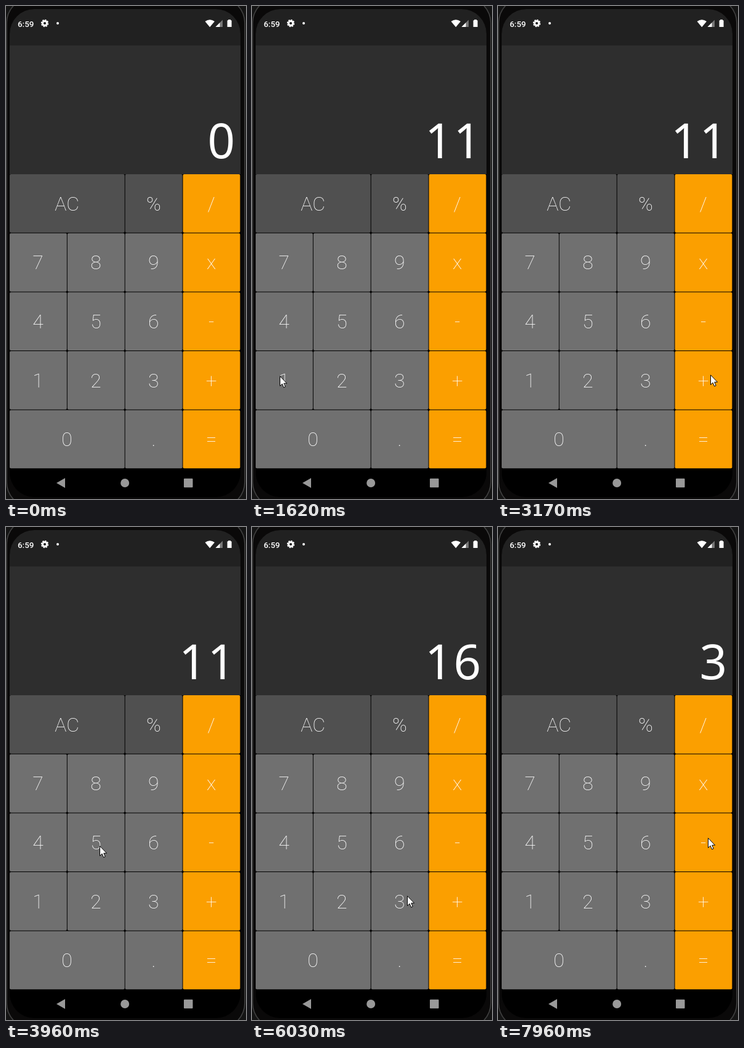
These frames come from a looping animation (390 by 800 pixels, 8 s). An HTML page:

```html
<!DOCTYPE html>
<html lang="en">
<head>
<meta charset="utf-8">
<title>Calculator</title>
<style>
  html, body { margin: 0; width: 100%; height: 100%; overflow: hidden; background: #141414; }
  svg { display: block; }
  #labels { font: 200 32px Roboto, sans-serif; fill: #fff; text-anchor: middle; }
  .clock { font: 500 13.4px Roboto, sans-serif; fill: #fff; }
  #display { font: 500 78px "Noto Sans", sans-serif; letter-spacing: 2px; fill: #fff; text-anchor: end; }
</style>
</head>
<body>
<svg width="390" height="800" viewBox="0 0 390 800">
  <clipPath id="screen"><rect x="6" y="5" width="375" height="792" rx="40"/></clipPath>
  <rect x="1" y="-14" width="387" height="828" rx="42" fill="#0a0909" stroke="#404040" stroke-width="1.6"/>
  <g clip-path="url(#screen)">
    <rect x="6" y="5" width="375" height="792"/>
    <rect x="6" y="5" width="375" height="59" fill="#212121"/>
    <rect x="6" y="64" width="375" height="209" fill="#2e2e2e"/>
  </g>

  <text class="clock" x="19" y="33.5">6:59</text>
  <g fill="none" stroke="#fff">
    <circle cx="63" cy="28" r="3.5" stroke-width="2.8"/>
    <circle cx="63" cy="28" r="5.2" stroke-width="2" pathLength="16" stroke-dasharray="1.3 .7"/>
  </g>
  <g fill="#fff">
    <circle cx="84" cy="28" r="2"/>
    <path d="M323.5 25Q331.2 19.5 339 25L331.2 34.2Z"/>
    <path d="M352 22.5V34H340.5Z" fill="#777"/>
    <path d="M347.5 27V34H340.5Z"/>
    <path d="M361.2 22H365V23.3H366.6V34H359.6V23.3H361.2Z"/>
  </g>

  <text id="display" x="374.2" y="247"></text>
  <g id="keys"></g>
  <rect id="highlight" x="287.5" y="560" width="93" height="94.7" rx="2" fill-opacity=".1"/>
  <circle id="ripple" fill-opacity=".11"/>
  <g id="labels"></g>

  <g fill="#999">
    <path d="M82 774L96 766V782Z"/>
    <circle cx="193.2" cy="774" r="7"/>
    <rect x="289" y="766.7" width="14.5" height="14.5" rx="1"/>
  </g>

  <path id="cursor" d="M.5 .8V16.6L4.1 13.2L6.6 19.1L9.2 18L6.8 12.3H11.6Z" fill="#fff" stroke="#000" stroke-linejoin="round"/>
</svg>
<script>
const LOOP = 8000, STEP = 77;
const $ = id => document.getElementById(id);

// Keypad: each row lists label and column span.
const LEFT = 5.5, TOP = 272.6, COL = 93.85, ROW = 95.65, GAP = 1;
const rows = [
  [['AC', 2], ['%', 1], ['/', 1]],
  [['7', 1], ['8', 1], ['9', 1], ['x', 1]],
  [['4', 1], ['5', 1], ['6', 1], ['-', 1]],
  [['1', 1], ['2', 1], ['3', 1], ['+', 1]],
  [['0', 2], ['.', 1], ['=', 1]]
];
let keys = '', labels = '';
rows.forEach((row, r) => {
  let col = 0;
  for (const [label, span] of row) {
    const x = LEFT + col * COL, y = TOP + r * ROW, w = span * COL;
    const color = col === 3 ? '#fb9f00' : r === 0 ? '#505050' : '#707070';
    keys += `<rect x="${x + GAP / 2}" y="${y + GAP / 2}" width="${w - GAP}" height="${ROW - GAP}" rx="2" fill="${color}"/>`;
    labels += `<text x="${x + w / 2 - .3}" y="${y + ROW / 2 + 11.4}">${label}</text>`;
    col += span;
  }
});
$('keys').innerHTML = keys;
$('labels').innerHTML = labels;

const display = [[0, '0'], [1150, '1'], [1620, '11'], [4180, '5'], [5490, '16'], [6500, '3']];

// Pointer moves: start time, number of steps, target x, y.
const moves = [
  [0, 1, 420, 700],
  [300, 1, 209, 696], [377, 7, 45, 600],
  [1770, 5, 306, 602], [2230, 2, 351, 602],
  [3170, 1, 345, 598], [3230, 7, 152, 517],
  [4330, 5, 343, 599], [5030, 1, 342, 600],
  [5490, 8, 252, 598],
  [7040, 3, 379, 582], [7280, 1, 420, 582],
  [7590, 1, 366, 535], [7667, 4, 341, 504]
];

// Presses: start, end, ripple radius, whether the plus key darkens.
const presses = [
  [920, 1080, 15], [1240, 1390, 15], [2470, 2640, 15, true],
  [3780, 3960, 15], [5270, 5490, 10, true], [6110, 6350, 15]
];

const ease = p => (1 - Math.cos(Math.PI * p)) / 2;

function pointer(t) {
  const i = moves.findLastIndex(m => m[0] <= t);
  const [start, steps, x, y] = moves[i];
  const [, , fromX, fromY] = moves[Math.max(0, i - 1)];
  const p = ease(Math.min(1, (Math.floor((t - start) / STEP) + 1) / steps));
  return [fromX + (x - fromX) * p, fromY + (y - fromY) * p];
}

function draw(now) {
  const t = now % LOOP;
  const [x, y] = pointer(t);
  const press = presses.find(([start, end]) => t >= start && t < end);
  $('display').textContent = display.findLast(([start]) => start <= t)[1];
  $('cursor').setAttribute('transform', `translate(${Math.round(x)} ${Math.round(y)})`);
  $('highlight').style.display = press && press[3] ? '' : 'none';
  $('ripple').setAttribute('cx', x);
  $('ripple').setAttribute('cy', y + 1);
  $('ripple').setAttribute('r', press ? press[2] : 0);
}

const origin = performance.now();
function tick() {
  draw(performance.now() - origin);
  requestAnimationFrame(tick);
}
tick();
</script>
</body>
</html>
```
